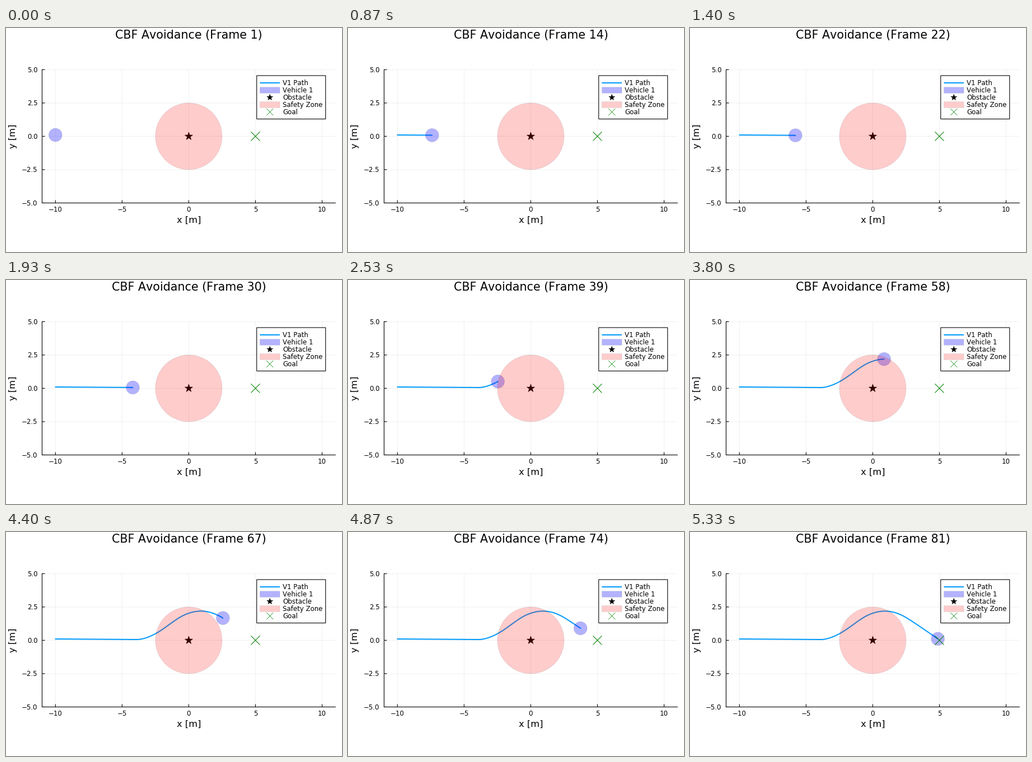
Animation, 600 px wide and 400 px high, one loop 5390 ms. Source, as a matplotlib script:

```python
import numpy as np
import matplotlib.pyplot as plt
from matplotlib.animation import FuncAnimation
from matplotlib.patches import Circle, Polygon, Rectangle

W, H, DPI = 600, 400, 100
PX = 72 / DPI                 # points per pixel
FRAMES, LOOP_MS = 81, 5390
UNIT, X0, Y0 = 23.81, 326.35, 193.4
STEP = 0.2                    # metres travelled per frame
SMALL, MEDIUM, LARGE = 11.8, 16.3, 20.7

PATH_BLUE = "#009AFA"
BLUE_FILL = (0, 0, 1, 0.3)
RED_FILL = (1, 0, 0, 0.2)
EDGE = (0, 0, 0, 0.15)
GREEN = "#008000"

plt.rcParams["font.family"] = "DejaVu Sans"
plt.rcParams["text.kerning_factor"] = 12      # turns kerning off
fig = plt.figure(figsize=(W / DPI, H / DPI), dpi=DPI, facecolor="white")
ax = fig.add_axes([0, 0, 1, 1])
ax.set_xlim(0, W)
ax.set_ylim(H, 0)
ax.axis("off")


def sx(x):
    return X0 + UNIT * x


def sy(y):
    return Y0 - UNIT * y


def line(xs, ys, color="black", width=1.1, z=1, cap="butt"):
    return ax.plot(xs, ys, color=color, lw=width * PX, zorder=z, snap=False,
                   solid_capstyle=cap, solid_joinstyle="round")[0]


def label(x, y, s, size, ha="center", **kw):
    return ax.text(x, y, s, fontsize=size * PX, ha=ha, va="baseline",
                   zorder=12, **kw)


def shape(patch, fill, z, edge=EDGE, width=0.6):
    patch.set(facecolor=fill, edgecolor=edge, linewidth=width * PX,
              zorder=z, snap=False)
    return ax.add_patch(patch)


def star(cx, cy, r, z):
    a = np.arange(10) * np.pi / 5
    rad = np.where(np.arange(10) % 2 == 0, r, 0.39 * r)
    pts = np.column_stack([cx + rad * np.sin(a), cy - rad * np.cos(a)])
    shape(Polygon(pts), "black", z, "black")


def cross(cx, cy, r, width, z):
    for s in (1, -1):
        line([cx - r, cx + r], [cy - s * r, cy + s * r], GREEN, width, z)


def drive():
    """Straight run, then a smooth swerve through timed poses."""
    n = np.arange(FRAMES)
    xs = -10 + STEP * n
    ys = 0.1 * (5 - xs) / 15
    # frame, x, y, heading in degrees
    poses = [(31, -3.8, 0.059, 5), (38, -2.47, 0.51, 29),
             (48, -0.82, 1.63, 33), (57, 0.85, 2.19, 2),
             (66, 2.56, 1.67, -32), (80, 4.88, 0.11, -34.4)]
    for (a, xa, ya, ha), (b, xb, yb, hb) in zip(poses, poses[1:]):
        k = np.arange(a, b + 1)
        u = (k - a) / (b - a)
        reach = STEP * (b - a)
        h01 = u * u * (3 - 2 * u)
        h10 = reach * u * (1 - u) ** 2
        h11 = reach * u * u * (u - 1)
        ha, hb = np.radians([ha, hb])
        xs[k] = xa + (xb - xa) * h01 + h10 * np.cos(ha) + h11 * np.cos(hb)
        ys[k] = ya + (yb - ya) * h01 + h10 * np.sin(ha) + h11 * np.sin(hb)
    return sx(xs), sy(ys)


def draw_axes():
    left, right, top, bottom = sx(-11), sx(11), sy(5), sy(-5)
    grid = (0, 0, 0, 0.06)
    for v in (-10, -5, 0, 5, 10):
        x = sx(v)
        line([x, x], [top, bottom], grid, 1, 0)
        line([x, x], [bottom, bottom - 5], z=10)
        label(x, 328, str(v).replace("-", "\u2212"), SMALL)
    for v in (-5, -2.5, 0, 2.5, 5):
        y = sy(v)
        line([left, right], [y, y], grid, 1, 0)
        line([left, left + 5], [y, y], z=10)
        label(56.3, y + 4.2, f"{v:.1f}".replace("-", "\u2212"), SMALL, "right")
    line([left, right], [bottom, bottom], z=10, cap="projecting")
    line([left, left], [top, bottom], z=10, cap="projecting")
    label(X0 + 0.2, 347.8, "x [m]", MEDIUM)
    label(16.6, Y0 - 0.5, "y [m]", MEDIUM, rotation=90,
          rotation_mode="anchor")


def draw_legend():
    shape(Rectangle((447.7, 85), 123, 77.5), "white", 10, "black", 1.1)
    names = ["V1 Path", "Vehicle 1", "Obstacle", "Safety Zone", "Goal"]
    rows = [98 + 13 * i for i in range(5)]
    for name, y in zip(names, rows):
        label(494, y + 4.1, name, SMALL, "left")
    line([453.3, 489], [rows[0]] * 2, PATH_BLUE, 2, 11)
    for y, fill in ((rows[1], BLUE_FILL), (rows[3], RED_FILL)):
        shape(Rectangle((453.5, y - 5.3), 35.5, 10.6), fill, 11)
    star(471.2, rows[2], 5.6, 11)
    cross(471.2, rows[4], 6, 0.65, 11)


draw_axes()
px, py = drive()
path = line([], [], PATH_BLUE, 2, 2, "round")
vehicle = shape(Circle((px[0], py[0]), 0.5 * UNIT), BLUE_FILL, 3)
star(X0, Y0, 7.4, 4)
shape(Circle((X0, Y0), 2.5 * UNIT), RED_FILL, 5)
cross(sx(5), Y0, 8, 1.05, 6)
draw_legend()
title = label(X0 + 0.2, 18.8, "", LARGE)


def update(i):
    path.set_data(px[:i + 1], py[:i + 1])
    path.set_visible(i > 0)
    vehicle.center = px[i], py[i]
    title.set_text(f"CBF Avoidance (Frame {i + 1})")
    return path, vehicle, title


anim = FuncAnimation(fig, update, frames=FRAMES, interval=LOOP_MS / FRAMES,
                     repeat=True, repeat_delay=0, blit=False)
plt.show()
```
